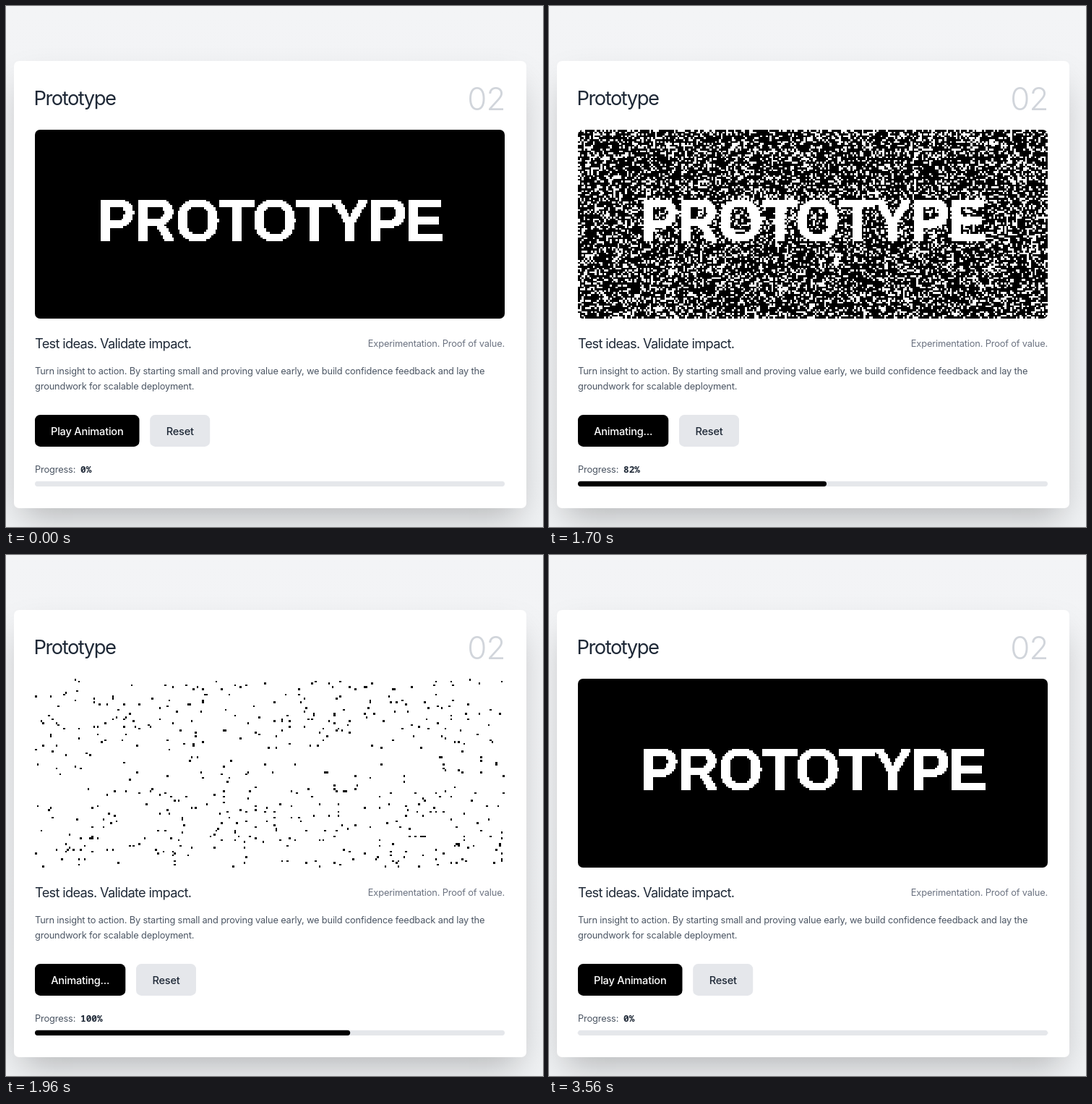
Write an HTML page with a canvas that moves like this. It is 743 by 720 pixels and loops after 3680 ms.

```html
<!DOCTYPE html>
<html lang="en">
<head>
<meta charset="utf-8">
<title>Prototype</title>
<style>
  html, body { margin: 0; width: 100%; height: 100%; overflow: hidden; }
  body { position: relative; background: linear-gradient(#f3f4f6, #f0f2f4); }
  .card {
    position: absolute; left: 11px; top: 76px; width: 709px; height: 617.5px;
    background: #fff; border-radius: 7px; box-shadow: 0 23px 46px -11px rgba(0, 0, 0, .25);
  }
  canvas {
    position: absolute; left: 40px; top: 171px; width: 650px; height: 260.5px;
    border-radius: 7px; image-rendering: pixelated;
  }
  svg { position: absolute; left: 0; top: 0; }
  text { font: 12.8px Inter, sans-serif; letter-spacing: -.012em; fill: #4b5563; }
  .title { font-size: 27.4px; letter-spacing: -.055em; fill: #1f2937; }
  .number { font-size: 43.9px; font-weight: 300; letter-spacing: -.02em; text-anchor: end; fill: #d1d5db; }
  .lead { font-size: 18.3px; letter-spacing: -.039em; fill: #1f2937; }
  .note { text-anchor: end; fill: #6b7280; }
  .label { font-size: 14.6px; font-weight: 500; letter-spacing: -.016em; text-anchor: middle; fill: #1f2937; }
  .light { fill: #fff; }
  .mono { font-family: "Noto Sans Mono", monospace; font-weight: 600; letter-spacing: 0; fill: #1f2937; }
</style>
</head>
<body>
<div class="card"></div>
<canvas id="screen" width="250" height="100"></canvas>
<svg width="743" height="720">
  <text class="title" x="38.5" y="137">Prototype</text>
  <text class="number" x="690.5" y="144">02</text>
  <text class="lead" x="40" y="473">Test ideas. Validate impact.</text>
  <text class="note" x="690" y="471">Experimentation. Proof of value.</text>
  <text x="40" y="509">Turn insight to action. By starting small and proving value early, we build confidence feedback and lay the</text>
  <text x="40" y="529.7">groundwork for scalable deployment.</text>

  <rect id="play" x="40" y="565" height="44" rx="7.3"/>
  <text id="playLabel" class="label light" y="592.6"></text>
  <g id="reset">
    <rect y="565" width="83" height="44" rx="7.3" fill="#e5e7eb"/>
    <text class="label" x="41.5" y="592.6">Reset</text>
  </g>

  <text x="40" y="644.5">Progress:</text>
  <text id="percent" class="mono" x="103" y="644.5"></text>
  <rect x="40" y="656.7" width="650" height="7.3" rx="3.65" fill="#e5e7eb"/>
  <rect id="bar" x="40" y="656.7" height="7.3" rx="3.65"/>

  <g id="cursor" stroke-linejoin="round">
    <path id="arrow" d="M0 0V15.5L3.6 12.2L6 17.6L8.4 16.6L6 11.3H11Z" stroke="#fff"/>
    <path id="hand" fill="#fff" stroke="#222" d="M-1 1.2Q0-.8 1.3 1L2.6 5.2Q4 4 5 5.4Q6.5 4.6 7.3 6Q9 5.6 9.4 7.2
      L9.6 11L8 15H.8L-3.2 9.6Q-3.6 7.6-1.6 8L.4 9.4Z M3 9.5V12.5M5.2 9.3V12.5M7.2 9.3V12.5"/>
  </g>
</svg>
<script>
const LOOP = 3680, START = 480, DONE = 1970, RESET = 2790;
const COLS = 250, ROWS = 100;
const $ = id => document.getElementById(id);
const clamp = v => Math.max(0, Math.min(1, v));

// Piecewise linear value through [time, value] points.
function track(points, t) {
  const i = points.findIndex(p => p[0] > t);
  if (i < 0) return points[points.length - 1][1];
  if (i === 0) return points[0][1];
  const [t0, a] = points[i - 1], [t1, b] = points[i];
  return a + (b - a) * (t - t0) / (t1 - t0);
}

// cubic-bezier(.4, 0, .2, 1)
function ease(x) {
  x = clamp(x);
  let lo = 0, hi = 1, s = .5;
  for (let i = 0; i < 20; i++) {
    s = (lo + hi) / 2;
    const u = 1 - s;
    if (1.2 * s * u * u + .6 * s * s * u + s ** 3 < x) lo = s; else hi = s;
  }
  return s * s * (3 - 2 * s);
}

const percentTrack = [[START, 0], [780, 20.3], [1340, 57.4], [1780, 88.3], [1955, 100]];
const barTrack = [[START, 0], [630, 1.2], [780, 4.3], [1060, 17.3], [1340, 33.4], [1780, 57.2], [DONE, 67.6]];
const cursorX = [[60, 205], [360, 120], [520, 120], [780, 235], [840, 250], [2400, 255], [2660, 237], [2860, 237], [3100, 262]];
const cursorY = [[60, 732], [360, 592], [520, 592], [780, 713], [840, 740], [2400, 740], [2660, 605], [2860, 605], [3100, 740]];

// Each cell turns white once the dissolve passes its threshold; word cells start white.
const ctx = $('screen').getContext('2d', { willReadFrequently: true });
ctx.font = 'bold 31px "Liberation Sans", Arial, sans-serif';
ctx.letterSpacing = '-0.7px';
ctx.textAlign = 'center';
ctx.fillText('PROTOTYPE', COLS / 2, 59);
const image = ctx.getImageData(0, 0, COLS, ROWS);
let seed = 7;
const random = () => (seed = seed * 48271 % 2147483647) / 2147483647;
const thresholds = Array.from({ length: COLS * ROWS }, (_, i) =>
  image.data[i * 4 + 3] > 70 ? -1 : random());
const pixels = new Uint32Array(image.data.buffer);
let shown;

function drawScreen(amount) {
  if (amount === shown) return;
  shown = amount;
  thresholds.forEach((v, i) => { pixels[i] = v < amount ? 0xffffffff : 0xff000000; });
  ctx.putImageData(image, 0, 0);
}

function drawCursor(t) {
  const x = track(cursorX, t), y = track(cursorY, t);
  const onButton = y < 609;
  $('cursor').setAttribute('transform', `translate(${x} ${y})`);
  $('arrow').style.display = onButton ? 'none' : '';
  $('hand').style.display = onButton ? '' : 'none';
}

function draw(t) {
  const playing = t >= START && t < 2000;
  const playWidth = playing ? 125.3 : 144.5;
  $('play').setAttribute('width', playWidth);
  $('playLabel').setAttribute('x', 40 + playWidth / 2);
  $('playLabel').textContent = playing ? 'Animating...' : 'Play Animation';
  $('reset').setAttribute('transform', `translate(${playWidth + 54.7})`);

  const wasReset = t >= RESET;
  $('percent').textContent = (wasReset ? 0 : Math.floor(track(percentTrack, t))) + '%';
  let bar = track(barTrack, t);
  if (t > DONE) bar += (100 - bar) * ease((t - DONE) / 150);
  if (wasReset) bar = 100 * (1 - ease((t - RESET - 20) / 150));
  $('bar').setAttribute('width', bar * 6.5);

  drawScreen(wasReset ? 0 : clamp((t - 1588) / 382));
  drawCursor(t);
}

function frame() {
  draw(performance.now() % LOOP);
  requestAnimationFrame(frame);
}
frame();
</script>
</body>
</html>
```
